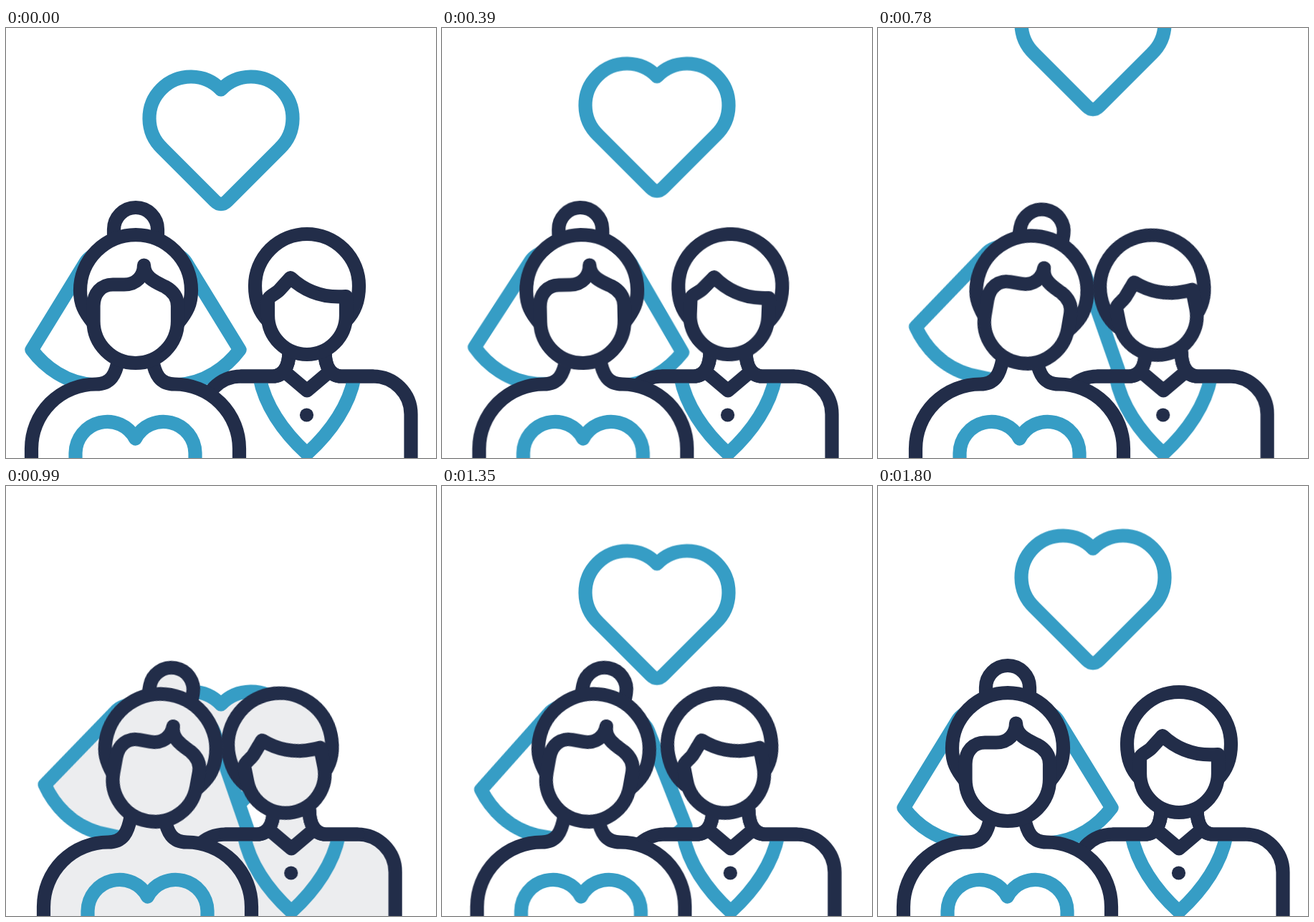
Animation, 600 px wide and 600 px high, one loop 1830 ms. Source, as an HTML page:

```html
<!DOCTYPE html>
<html lang="en">
<head>
<meta charset="utf-8">
<title>Wedding couple</title>
<style>
  :root { --navy: #222d49; --blue: #369dc5; --loop: 1830ms; --ease: cubic-bezier(.333, 0, .667, 1); }
  html, body { margin: 0; width: 100%; height: 100%; overflow: hidden; background: #fff; }
  svg {
    display: block; width: 100%; height: 100%;
    stroke: var(--navy); stroke-width: 19.2; stroke-linecap: round; stroke-linejoin: round;
    animation: tint var(--loop) step-end infinite;
  }
  .blue { stroke: var(--blue); }
  .line { fill: none; }
  .button { fill: var(--navy); stroke: none; }

  .heart, .bride, .groom, .bride-head, .groom-head, .veil {
    animation: var(--loop) var(--ease) infinite;
  }
  .heart { animation-name: rise; }
  .bride { --shift: 17px; animation-name: slide; }
  .groom { --shift: -21.8px; animation-name: slide; }
  .bride-head { transform-origin: 181px 465px; animation-name: bride-tilt; }
  .groom-head { transform-origin: 420px 441px; animation-name: groom-tilt; }
  .veil { transform-origin: 181px 312px; animation-name: sway; }

  @keyframes tint {
    0%, 55.68%, 85.2%, 100% { fill: #fff; }
    54.05% { fill: #ecedef; }
    83.55% { fill: #e8f3f8; }
  }
  /* drift up, fly off the top, come back from behind the heads */
  @keyframes rise {
    0% { transform: translateY(0); animation-timing-function: linear; }
    35.25% { transform: translateY(-30.3px); animation-timing-function: ease-in; }
    47.54% { transform: translateY(-265px); animation-timing-function: step-end; }
    47.55%, 50.9% { transform: translateY(237px); }
    68.85% { transform: translateY(26.8px); animation-timing-function: linear; }
    100% { transform: translateY(0); }
  }
  @keyframes slide {
    0%, 9.29%, 83.06%, 100% { transform: translateX(0); }
    22.95%, 69.95% { transform: translateX(var(--shift)); }
  }
  @keyframes bride-tilt {
    0%, 3.28%, 95.08%, 100% { transform: rotate(0deg); }
    16.94% { transform: rotate(-2deg); }
    46.99%, 72.13% { transform: rotate(10.3deg); }
  }
  @keyframes groom-tilt {
    0%, 3.28%, 95.08%, 100% { transform: rotate(0deg); }
    16.94% { transform: rotate(3.5deg); }
    42.62%, 72.13% { transform: rotate(-11.4deg); }
  }
  @keyframes sway {
    0%, 70.49%, 100% { transform: rotate(0deg); }
    18.03%, 48% { transform: rotate(2.7deg); }
  }
</style>
</head>
<body>
<svg viewBox="0 0 600 600">
  <path class="heart blue" d="M300 86A58 58 0 1 0 218 168L291.5 241.5Q300 250 308.5 241.5L382 168A58 58 0 1 0 300 86Z"/>

  <g class="bride">
    <g class="bride-head">
      <path class="veil blue" d="M36 449L111 327C120 312 150 305 181 305S242 312 251 327L326 449C308 473 278 496 238 498H124C84 496 54 473 36 449Z"/>
    </g>
  </g>

  <g class="groom">
    <path d="M275 615V539A53 53 0 0 1 328 486H372C387 486 395 472 395 452H445C445 472 453 486 468 486H512A53 53 0 0 1 565 539V615Z"/>
    <path class="line blue" d="M354 488C361 525 385 562 420 594C455 562 479 525 486 488"/>
    <path class="line" d="M328 486H372C387 486 395 472 395 452M445 452C445 472 453 486 468 486H512M394 484L420 506L446 484"/>
    <circle class="button" cx="419.5" cy="540" r="9.6"/>
    <g class="groom-head">
      <path d="M366 409C353 396 347.5 380 347.5 360A72.5 72.5 0 0 1 492.5 360C492.5 380 487 396 474 409Z"/>
      <path d="M365.5 401V381C365.5 374 376 372 382 365L397 348.5C420 370 446 377 474.5 374.5V401A54.5 54.5 0 0 1 365.5 401Z"/>
    </g>
  </g>

  <g class="bride">
    <path d="M35.5 615V587A90 90 0 0 1 125.5 497C146 497 153 484 157 462H204C208 484 215 497 235.5 497A90 90 0 0 1 325.5 587V615Z"/>
    <path class="line blue" d="M97 615V593A44.3 44.3 0 0 1 180.5 573A44.3 44.3 0 0 1 264 593V615"/>
    <g class="bride-head">
      <path d="M150.5 288V281A30.5 30.5 0 0 1 211.5 281V288"/>
      <path d="M122 412C109 396 103.5 385 103.5 366A77.5 77.5 0 0 1 258.5 366C258.5 385 253 396 240 412Z"/>
      <path d="M122 409V388C122 370 133 358 149 358H165C182 358 192.5 346 192.5 331C193 349 210 355 222 361C233 367 239.5 376 239.5 388V409A58.75 58.5 0 0 1 122 409Z"/>
    </g>
  </g>
</svg>
</body>
</html>
```
